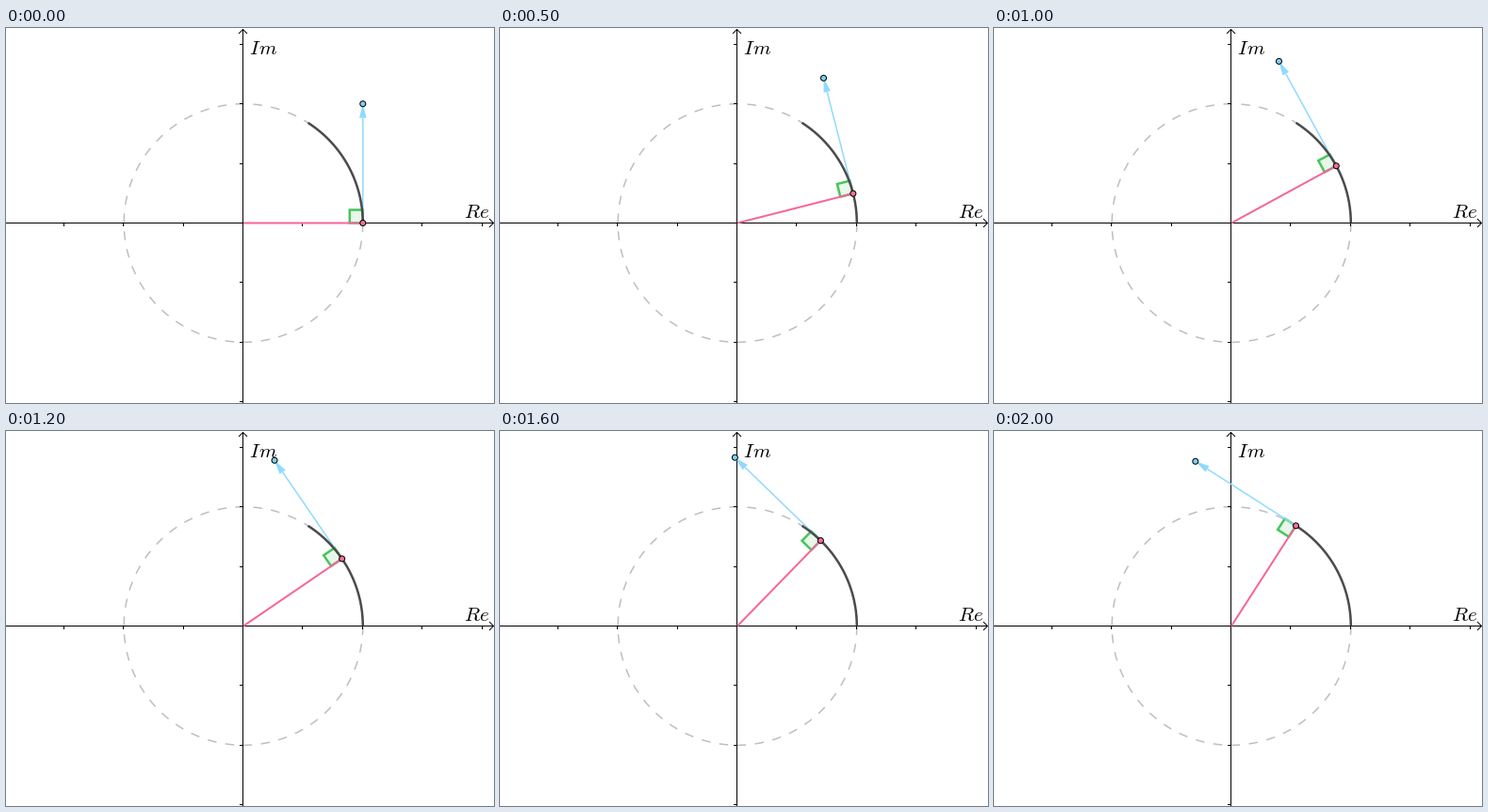
Animation, 518 px wide and 399 px high, one loop 2100 ms. Source, as a matplotlib script:

```python
import numpy as np
import matplotlib.pyplot as plt
from matplotlib.animation import FuncAnimation
from matplotlib.patches import Circle, Polygon

plt.rcParams["mathtext.fontset"] = "cm"
plt.rcParams["path.snap"] = False

W, H, DPI = 518, 399, 72        # at 72 dpi one point is one pixel
CX, CY = 251.5, 207.5           # axes, on pixel centres
ORIGIN = np.array([252.0, 207.5])
UNIT = 126.8
FRAMES, INTERVAL = 21, 100
STEP = 0.05                     # radians per frame
CORNER = 14                     # side of the right-angle mark
HEAD, HALF = 15, 3.75           # arrowhead length and half width

GREY, DARK = "#bebebe", "#4b4b4b"
PINK, BLUE, GREEN = "#f7659a", "#8fdaff", "#48c45c"

fig = plt.figure(figsize=(W / DPI, H / DPI), dpi=DPI, facecolor="white")
ax = fig.add_axes([0, 0, 1, 1])
ax.set_xlim(0, W)
ax.set_ylim(H, 0)
ax.axis("off")


def direction(angle):
    """Unit vector on screen, where y points down."""
    return np.array([np.cos(angle), -np.sin(angle)])


def stroke(xs, ys, color, width, z, **kw):
    kw.setdefault("solid_capstyle", "butt")
    return ax.plot(xs, ys, color=color, lw=width, zorder=z, **kw)[0]


def arc(start, end, *args, **kw):
    xs, ys = ORIGIN[:, None] + UNIT * direction(np.linspace(start, end, 300))
    return stroke(xs, ys, *args, **kw)


def draw_axes():
    def line(xs, ys):
        stroke(xs, ys, "black", 1, 6)

    line([0, W - 1], [CY, CY])
    line([CX, CX], [1.5, H])
    line([W - 5, W - 0.5, W - 5], [CY - 4.5, CY, CY + 4.5])
    line([CX - 4.5, CX, CX + 4.5], [6, 1.5, 6])
    for k in (-3, -2, -1, 1, 2, 3, 4):
        x, y = np.floor([CX + k * UNIT / 2, CY + k * UNIT / 2]) + 0.5
        line([x, x], [CY, CY + 3.5])
        line([CX - 3.5, CX], [y, y])
    ax.text(257.5, 28.3, r"$I\hspace{0.04}m$", fontsize=21.2, va="baseline", zorder=7)
    ax.text(485.5, 202.3, "$Re$", fontsize=21.2, va="baseline", zorder=7)


def dot(color):
    return ax.add_patch(Circle(ORIGIN, 3, fc=color, ec="black", lw=1, zorder=12))


draw_axes()
arc(0, -2 * np.pi, GREY, 1.5, 2, dashes=(9.5 / 1.5, 9.5 / 1.5), dash_capstyle="butt")
arc(0, 1, DARK, 2.5, 10)

corner = ax.add_patch(Polygon(np.zeros((4, 2)), fc=(0.28, 0.77, 0.36, 0.13),
                              ec=GREEN, lw=2.5, joinstyle="miter", zorder=7))
radius = stroke([], [], PINK, 2, 8)
shaft = stroke([], [], BLUE, 1.5, 9)
head = ax.add_patch(Polygon(np.zeros((3, 2)), fc=BLUE, lw=0, zorder=9))
foot_dot, tip_dot = dot("#f4709a"), dot("#7fd0f5")


def update(i):
    out = direction(STEP * i)
    side = direction(STEP * i + np.pi / 2)
    foot = ORIGIN + UNIT * out
    tip = foot + UNIT * side
    base = tip - HEAD * side

    inner = foot - CORNER * out
    corner.set_xy([foot, inner, inner + CORNER * side, foot + CORNER * side])
    radius.set_data(*zip(ORIGIN, foot))
    shaft.set_data(*zip(foot, base))
    head.set_xy([tip, base + HALF * out, base - HALF * out])
    foot_dot.center = foot
    tip_dot.center = tip
    return corner, radius, shaft, head, foot_dot, tip_dot


anim = FuncAnimation(fig, update, frames=FRAMES, interval=INTERVAL,
                     repeat=True, repeat_delay=0, blit=False)
plt.show()
```
